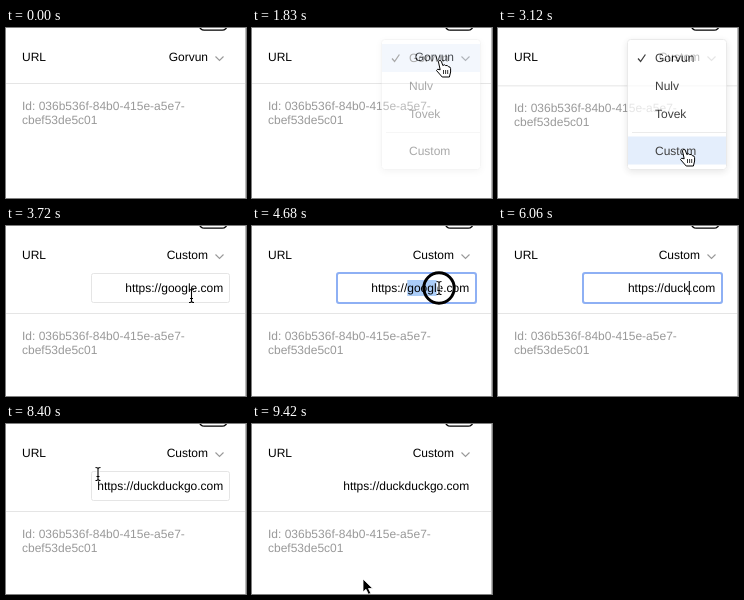
Animation of 240x170 px, one loop 9.45 s. Source, as an HTML page:

```html
<!DOCTYPE html>
<html lang="en">
<head>
<meta charset="utf-8">
<style>
  html, body { margin: 0; width: 100%; height: 100%; overflow: hidden; background: #fff; }
  svg {
    display: block; width: 240px; height: 170px;
    font: 12px "Liberation Sans", Arial, sans-serif;
    text-rendering: geometricPrecision;
  }
  .end { text-anchor: end; }
  .line { stroke: #e5e5e5; fill: none; }
</style>
</head>
<body>
<svg viewBox="0 0 240 170">
  <defs>
    <filter id="shadow" x="-20%" y="-20%" width="140%" height="140%">
      <feDropShadow dx="0" dy="2" stdDeviation="3.5" flood-opacity=".13"/>
    </filter>
  </defs>
  <rect x="193.2" y="-17.3" width="28" height="19.5" rx="5" fill="#fff" stroke="#000" stroke-width="1.3"/>
  <path d="M239.5 0V170" stroke="#bbb"/>
  <text x="16" y="33">URL</text>
  <rect id="selectBorder" class="line" x="156.5" y="15.5" width="67" height="28" rx="2"/>
  <text id="choice" class="end" x="202" y="33"></text>
  <path d="M209.5 28.5l4 4 4-4" fill="none" stroke="#999" stroke-width="1.1"/>

  <g id="field">
    <rect id="fieldBorder" class="line" x="85.5" y="47.5" width="138" height="29" rx="2"/>
    <rect id="focus" x="85" y="47" width="139" height="30" rx="2" fill="none" stroke="#8eb0f4" stroke-width="2"/>
    <rect id="selection" y="54" height="16" fill="#abcdf8"/>
    <text id="address" class="end" x="217.3" y="66"></text>
    <path id="caret" d="M0 55V69" stroke="#000"/>
  </g>

  <g id="below">
    <path class="line" d="M0 55.5H239"/>
    <g fill="#999">
      <text x="16" y="82">Id: 036b536f-84b0-415e-a5e7-</text>
      <text x="16" y="96">cbef53de5c01</text>
    </g>
  </g>

  <g id="menu">
    <rect x="129.5" y="11.5" width="99" height="130" rx="3" fill="#fff" stroke="#e4e4e4" filter="url(#shadow)"/>
    <rect id="active" x="130" width="98" height="28" fill="#dce9fb"/>
    <path d="M134 104.5H228" class="line"/>
    <path d="M140 30.5l2.6 3 4.8-7" fill="none" stroke="#000" stroke-width="1.3"/>
  </g>

  <circle id="ring" fill="none" stroke="#000" stroke-width="3"/>
  <g id="cursor">
    <path id="arrow" d="M0 0V13L3 10.3 5.4 15.3 7.8 14.2 5.5 9.5H9.7Z" stroke="#fff" stroke-width=".8"/>
    <g id="hand" fill="#fff" stroke="#000" stroke-linejoin="round">
      <path d="M-3.5 1.5Q-2 -1 -.5 1.5L.8 5.5Q2.6 4 3.7 5.6 5.6 4.8 6.4 6.7 8.4 6.5 8.6 8.6V12L7.4 17H.2L-5.5 10.5Q-5-8.3-2 9.8Z" display="none"/>
      <path d="M-3.6 1.6Q-2 -1 -.6 1.4L.8 5.5Q2.6 4 3.7 5.6 5.6 4.8 6.4 6.7 8.4 6.5 8.6 8.6V12L7.4 17H.2L-5.5 10.5Q-5 8.3-1.8 9.8Z"/>
      <path d="M1.5 10V14M3.6 10V14M5.7 10V14" stroke-width=".8"/>
    </g>
    <g id="beam" fill="none">
      <path d="M0-6V6" stroke="#fff" stroke-width="3"/>
      <path d="M-2.5-6.5Q0-6.5 0-5 0-6.5 2.5-6.5M0-5V5M-2.5 6.5Q0 6.5 0 5 0 6.5 2.5 6.5M-1.5 2.5H1.5" stroke="#000" stroke-width="1.1"/>
    </g>
  </g>
</svg>
<script>
const LOOP = 9450, STEP = 30;
const el = id => document.getElementById(id);
const set = (id, attrs) => { for (const k in attrs) el(id).setAttribute(k, attrs[k]); };
const fade = (id, value) => set(id, { opacity: value });
const show = (id, on) => fade(id, on ? 1 : 0);
const ramp = (t, start, end) => Math.min(1, Math.max(0, (t - start) / (end - start)));
const smooth = p => p * p * (3 - 2 * p);
const within = (v, a, b) => v >= a && v < b;

const options = [["Gorvun", 30], ["Nulv", 58], ["Tovek", 86], ["Custom", 122.5]];
for (const [name, y] of options) {
  const label = document.createElementNS("http://www.w3.org/2000/svg", "text");
  label.textContent = name;
  label.setAttribute("x", 157);
  label.setAttribute("y", Math.round(y + 4));
  el("menu").append(label);
}

const prefix = "https://", oldWord = "google", newWord = "duckduckgo";
const keyTimes = [5550, 5790, 5940, 6060, 6270, 6450, 6570, 6690, 7020, 7170];

// Pointer positions: time, x, y
const path = [
  [90, 190, 48], [180, 190, 42], [360, 190, 42], [450, 190, 48],
  [1830, 190, 32], [2130, 190, 32], [2250, 191, 84], [2730, 188, 121],
  [3450, 188, 121], [3720, 185.5, 70], [4140, 154, 62], [4350, 154, 62],
  [4680, 187, 62], [4830, 191, 61], [7620, 191, 61], [7830, 92, 48],
  [8370, 92, 48], [8400, 92, 50], [8700, 51, 72], [9090, 72, 66],
  [9240, 72, 66], [9420, 111, 155]
];

function pointerAt(t) {
  const i = path.findIndex(p => p[0] > t);
  if (i < 1) return (i < 0 ? path[path.length - 1] : path[0]).slice(1);
  const a = path[i - 1], b = path[i], p = smooth(ramp(t, a[0], b[0]));
  return [a[1] + (b[1] - a[1]) * p, a[2] + (b[2] - a[2]) * p];
}

function drawMenu(t, y) {
  fade("menu", ramp(t, 1800, 1890) * (1 - ramp(t, 3090, 3210)));
  const row = y < 44 ? 0 : y < 72 ? 1 : y < 102 ? 2 : 3;
  set("active", { y: options[row][1] - 14 });
}

function drawField(t, x) {
  const typed = keyTimes.filter(k => k <= t).length;
  const word = typed ? newWord.slice(0, typed) : oldWord;
  const address = el("address");
  address.textContent = prefix + word + ".com";
  fade("field", ramp(t, 3120, 3240));
  fade("fieldBorder", 1 - ramp(t, 8430, 8550));
  fade("focus", ramp(t, 4260, 4350) * (1 - ramp(t, 8040, 8190)));

  const edge = n => address.getEndPositionOfChar(prefix.length + n - 1).x;
  const start = edge(0);
  let end = start;
  if (within(t, 4290, 5550)) {
    for (let n = 1; n <= word.length; n++)
      if (x > (edge(n - 1) + edge(n)) / 2) end = edge(n);
  }
  set("selection", { x: start, width: end - start });
  set("caret", { transform: `translate(${edge(word.length)})` });
  show("caret", typed && t < 8070);
}

function drawPointer(t, x, y) {
  const overField = t > 3270 && within(y, 46, 77) && x > 84;
  const kind = t < 3180 ? "hand" : overField ? "beam" : "arrow";
  for (const name of ["arrow", "hand", "beam"]) show(name, name === kind);
  set("cursor", { transform: `translate(${x} ${y})` });
  show("cursor", within(t, 90, 450) || within(t, 1830, 5550) || t >= 7620);
  const grow = ramp(t, 4260, 4350);
  set("ring", { cx: x, cy: y, r: 15.2 * (.7 + .3 * grow) });
  fade("ring", grow * (1 - ramp(t, 5010, 5070)));
}

function draw(now) {
  const t = Math.floor(now % LOOP / STEP) * STEP;
  const [x, y] = pointerAt(t);
  el("choice").textContent = options[t < 3120 ? 0 : 3][0];
  fade("selectBorder", ramp(t, 60, 180) * (1 - ramp(t, 330, 450)));
  set("below", { transform: `translate(0 ${32 * smooth(ramp(t, 3090, 3270))})` });
  drawMenu(t, y);
  drawField(t, x);
  drawPointer(t, x, y);
}

const began = performance.now();
function tick() {
  draw(performance.now() - began);
  requestAnimationFrame(tick);
}
tick();
</script>
</body>
</html>
```
